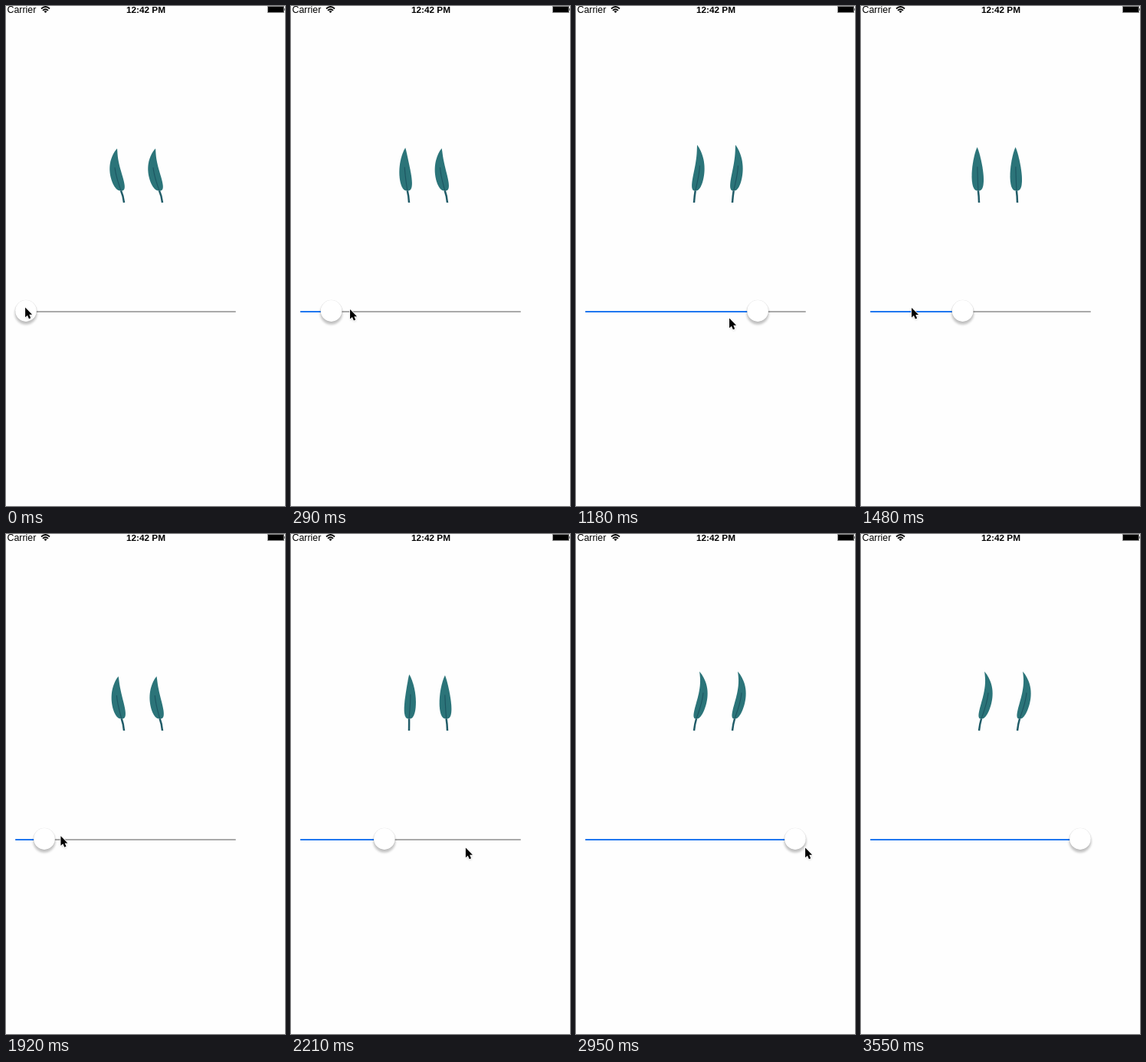
Animation, 364 px wide and 651 px high, one loop 3840 ms. Source, as an HTML page:

```html
<!DOCTYPE html>
<html>
<head>
<meta charset="utf-8">
<style>
html, body { margin: 0; width: 100%; height: 100%; overflow: hidden; background: #fefefe; }
svg { display: block; }
text { font-family: "Liberation Sans", Arial, sans-serif; fill: #000; }
</style>
</head>
<body>
<svg width="364" height="651" viewBox="0 0 364 651">
  <defs>
    <filter id="soft" x="-50%" y="-50%" width="200%" height="200%"><feGaussianBlur stdDeviation="1.7"/></filter>
    <path id="arrow" d="M0 0V14L3.2 11.2L5.4 16.2L7.9 15.1L5.8 10.2H10Z"/>
  </defs>
  <rect width="364" height="651" fill="#fefefe"/>

  <text x="1.5" y="8.7" font-size="12.4">Carrier</text>
  <text x="182.5" y="8.7" font-size="11.8" font-weight="bold" text-anchor="middle">12:42 PM</text>
  <g fill="none" stroke="#000" stroke-width="1.8">
    <path d="M46 3.5Q51.5 -1.4 57 3.5"/>
    <path d="M48 5.8Q51.5 2.7 55 5.8"/>
  </g>
  <path d="M51.5 9L49.4 7.1Q51.5 5.4 53.6 7.1Z"/>
  <rect x="341.5" y="0.5" width="21" height="8" fill="#000" stroke="#888"/>
  <rect x="363" y="3" width="1" height="3" fill="#777"/>

  <g id="feathers"></g>

  <rect x="12" y="397" width="288" height="2" rx="1" fill="#aaa"/>
  <rect id="fill" x="12" y="397" height="2" rx="1" fill="#2077f0"/>
  <g id="knob">
    <circle cy="400.3" r="14.5" opacity=".23" filter="url(#soft)"/>
    <circle cy="397" r="14.2" opacity=".12"/>
    <circle cy="397" r="13.9" fill="#fff"/>
  </g>

  <g id="cursor">
    <use href="#arrow" transform="translate(1 2) scale(.9)" opacity=".25" filter="url(#soft)"/>
    <use href="#arrow" transform="translate(.6 .6) scale(.9)" stroke="#fff" stroke-width="1.8" paint-order="stroke"/>
  </g>
</svg>
<script>
const LOOP = 3840, STEP = 147.4, EARLY = 6, LAST = 24;
const MIN = 26, MAX = 285;
const $ = id => document.getElementById(id);

// Cosine easing between [step, value] points.
function glide(k, points) {
  const i = points.findIndex(p => p[0] > k);
  if (i < 0) return points[points.length - 1][1];
  if (i === 0) return points[0][1];
  const [k0, a] = points[i - 1], [k1, b] = points[i];
  return a + (b - a) * (1 - Math.cos(Math.PI * (k - k0) / (k1 - k0))) / 2;
}

const knobX = k => glide(k, [[1, MIN], [5.7, 273], [6.36, 273], [12.6, 50], [13.4, 50], [17.7, 286]]);
const cursorX = k => glide(k, [[1, 24.5], [4.4, 286], [5.85, 286], [11.25, 33.5], [11.8, 33.5],
  [16.7, 298.5], [20, 298.5], [21, 289.5], [22, 289.5], [23, 345.5]]);
const cursorY = k => glide(k, [[0, 392], [5, 399], [8, 406], [10.2, 392], [12.5, 391],
  [15, 408], [20, 408], [21, 424], [22, 419], [23, 586]]);

function addPath(parent, look) {
  const p = document.createElementNS("http://www.w3.org/2000/svg", "path");
  for (const key in look) p.setAttribute(key, look[key]);
  parent.append(p);
  return p;
}

const feathers = [0, 50].map(dx => {
  const transform = `translate(${dx} 0)`;
  const line = (stroke, width) =>
    addPath($("feathers"), { transform, fill: "none", stroke, "stroke-width": width });
  return {
    blade: addPath($("feathers"), { transform, fill: "#2b7479" }),
    rib: line("#1d5561", 1.1),
    stem: line("#215c68", 2.5)
  };
});

// A bent midline with a rounded base and a pointed tip.
function bend(feather, x) {
  const u = (x - MIN) / (MAX - MIN);
  const root = 150 + 7 * u, height = 55 + 2.5 * u + 4 * u * u;
  const girth = 16.3 - 2.5 * u * u;
  const at = (s, side) => {
    const mid = root + (40.1 * u - 18.7) * s + (13.7 - 31.1 * u) * s ** 3;
    const half = girth * s ** 0.35 * (1 - s) ** 0.85;
    return [mid + side * half, 240.5 - height * s].map(v => v.toFixed(2)).join(" ");
  };
  const left = [], right = [], rib = [];
  for (let i = 0; i <= 30; i++) {
    const s = (i / 30) ** 2;
    left.push(at(s, -1));
    right.unshift(at(s, 1));
    rib.push(at(s * 0.55, 0));
  }
  feather.blade.setAttribute("d", "M" + left.concat(right).join("L") + "Z");
  feather.rib.setAttribute("d", "M" + rib.join("L"));
  feather.stem.setAttribute("d", `M154 256Q${153 + 2 * u} 247 ${at(0, 0)}`);
}

function draw(t) {
  const k = Math.min(LAST, Math.floor((t + EARLY) / STEP));
  const x = knobX(k);
  // the left feather runs ahead while the value rises
  bend(feathers[0], Math.max(x, knobX(k + 0.65)));
  bend(feathers[1], x);
  $("fill").setAttribute("width", x > MIN ? x - 12 : 0);
  $("knob").setAttribute("transform", `translate(${x} 0)`);
  $("cursor").setAttribute("transform", `translate(${cursorX(k)} ${cursorY(k)})`);
  $("cursor").setAttribute("visibility", k < LAST ? "visible" : "hidden");
}

const start = performance.now();
function tick() {
  draw((performance.now() - start) % LOOP);
  requestAnimationFrame(tick);
}
draw(0);
requestAnimationFrame(tick);
</script>
</body>
</html>
```
